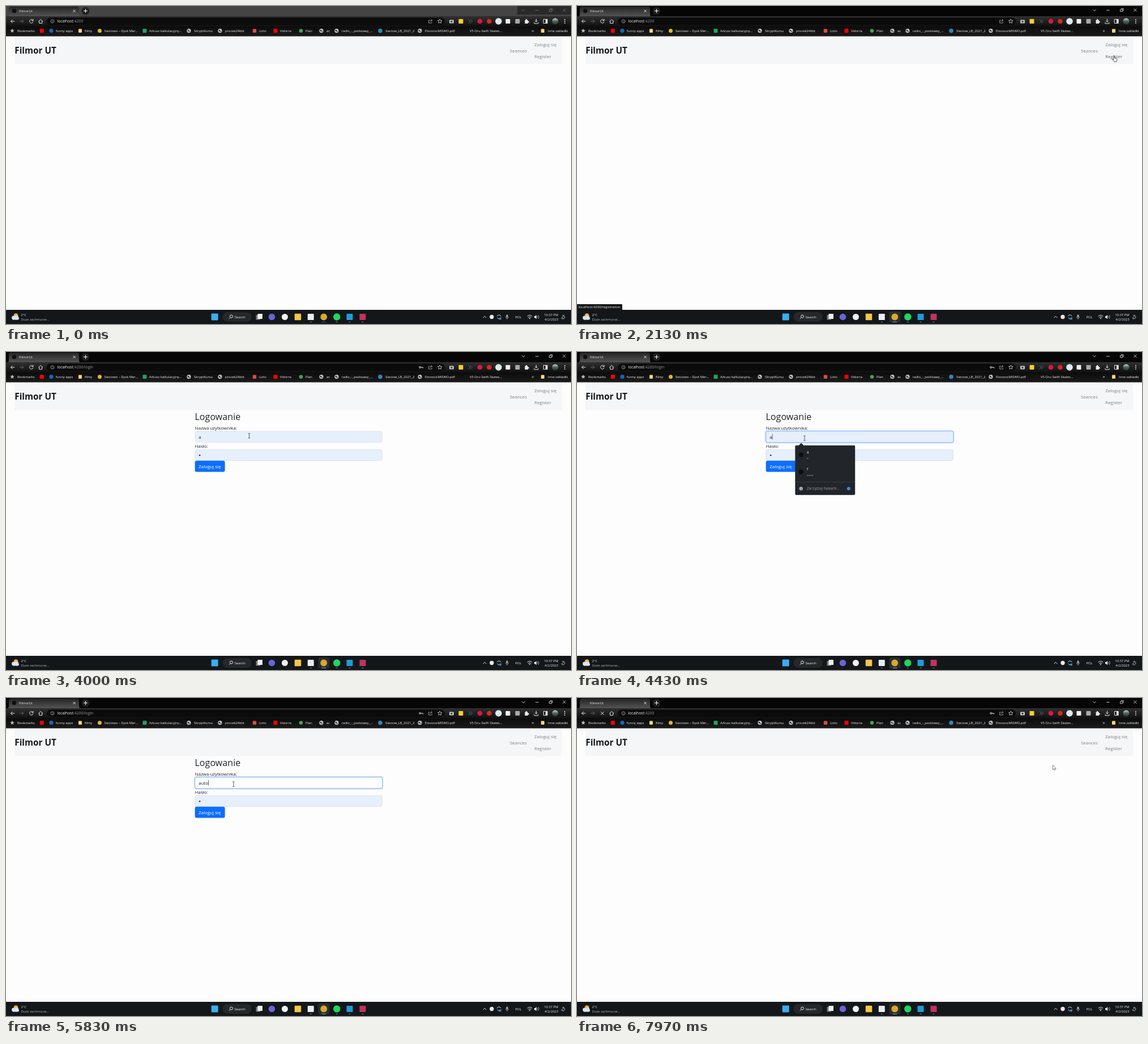
These frames come from a looping animation (998x561 px, 8 s). An HTML page:

```html
<!DOCTYPE html>
<html lang="pl">
<head>
<meta charset="utf-8">
<title>FilmorUt</title>
<style>
  html, body { margin: 0; width: 100%; height: 100%; overflow: hidden; background: #fdfdfd; }
  svg { display: block; width: 100%; height: 100%; }
  text { font-family: "Open Sans", "Noto Sans", sans-serif; white-space: pre; }
  .line { fill: none; stroke: #e4e4e4; stroke-width: 1; stroke-linecap: round; stroke-linejoin: round; }
</style>
</head>
<body>
<svg id="stage" viewBox="0 0 998 561" xmlns="http://www.w3.org/2000/svg"></svg>
<script>
const LOOP = 8000;
const INK = '#212529', BLUE = '#0d6efd', PALE = '#e6effc', PAGE = '#fdfdfd';

// Markup helpers
const text = (x, y, str, size = 5.85, fill = '#f0f0f0', extra = '') =>
  `<text x="${x}" y="${y}" font-size="${size}" fill="${fill}" ${extra}>${str}</text>`;
const rect = (x, y, w, h, fill, r = 0, extra = '') =>
  `<rect x="${x}" y="${y}" width="${w}" height="${h}" rx="${r}" fill="${fill}" ${extra}/>`;
const dot = (x, y, r, fill, extra = '') => `<circle cx="${x}" cy="${y}" r="${r}" fill="${fill}" ${extra}/>`;
const square = (x, y, size, fill) => rect(x - size / 2, y - size / 2, size, size, fill, 1);
const line = (d, extra = '') => `<path class="line" d="${d}" ${extra}/>`;
const group = (id, body) => `<g id="${id}">${body}</g>`;
const globe = (x, y) => dot(x, y, 3.6, '#c6cacd') +
  `<path d="M${x - 2.6} ${y - 1.2}q2 -1.6 3 .4t-1.6 2.4zM${x + .6} ${y + .6}h2.2l-1.6 2z" fill="#303336"/>`;
const folder = (x, y) => rect(x - 3, y - 3.2, 6, 6.6, '#f5d676', .8);
const star = (x, y, r, extra) => {
  const points = Array.from({ length: 10 }, (_, i) => {
    const a = i * Math.PI / 5 - Math.PI / 2, d = i % 2 ? r * .45 : r;
    return `${(x + d * Math.cos(a)).toFixed(2)},${(y + d * Math.sin(a)).toFixed(2)}`;
  });
  return `<polygon points="${points.join(' ')}" ${extra}/>`;
};

function tabStrip() {
  return rect(0, 0, 998, 19, '', 0, 'id="strip"') +
    '<path d="M2 18.5q3 0 3 -4v-10q0 -3.5 3.5 -3.5h117q3.5 0 3.5 3.5v10q0 4 3 4z" fill="url(#tab)"/>' +
    group('favicon', dot(14.5, 8.7, 3.7, '#101010')) +
    text(23, 10.8, 'FilmorUt', 5.9) +
    line('M118.8 7l3.6 3.6m0 -3.6l-3.6 3.6') +
    dot(140.5, 8.7, 6.8, '#202020') + line('M137.5 8.7h6m-3 -3v6', 'style="stroke:#fff"') +
    group('windowShade', rect(903, 0, 95, 15, '#292929')) +
    group('windowButtons', line('M911.5 6.3l2.5 2.4l2.5 -2.4M935.5 7.5h5M960 6h3.8v3.8h-3.8zM961.5 4.7h3.6v3.6M983.7 5l4.6 4.6m0 -4.6l-4.6 4.6', 'style="stroke-width:.8"'));
}

function toolbar() {
  const icons = [
    dot(837, 27, 4.3, '#dd1744'), dot(853.5, 27, 4.3, '#d8281f'), dot(870, 27, 5.8, '#dfeaec'),
    square(803.5, 27, 8, '#f4cf2d'), square(886.5, 27, 8, '#f0f0f0'), square(903.5, 27, 8, '#a9a9a9'),
    rect(783, 24.5, 8, 6, '#bfc3c5', 1), dot(787, 27.5, 1.6, '#333'),
    line('M817 24l3 3l-3 3m3.5 -6l3 3l-3 3', 'style="stroke:#4c7180"'),
    rect(916.5, 25, 5.5, 6, '#e8e8e8', .6), dot(919.2, 24.6, 1.5, '#e8e8e8'), dot(922.5, 28, 1.5, '#e8e8e8'),
    line('M936.5 23v5m-2 -2l2 2l2 -2M933 29v2h7v-2'),
    line('M949.8 23.5h6.4v7h-6.4z'), rect(953, 23.5, 3.2, 7, '#e4e4e4'),
    dot(970, 27, 5.5, 'url(#avatar)'),
    ...[24, 27, 30].map(y => dot(987, y, .9, '#e8e8e8'))
  ];
  return rect(0, 18, 998, 18, 'url(#bar)') + rect(72, 20.5, 703, 13, '#0b0b0b', 6.5) +
    line('M14.8 27h-6.3m2.7 -2.7l-2.7 2.7l2.7 2.7') +
    line('M24.5 27h6.3m-2.7 -2.7l2.7 2.7l-2.7 2.7', 'style="stroke:#666"') +
    group('reload', line('M47.6 25.3a3.2 3.2 0 1 0 .3 2.7M48 23.4v2.4h-2.4')) +
    group('stop', line('M42.2 24.5l5 5m0 -5l-5 5')) +
    line('M57.6 27l3.6 -3.3l3.6 3.3M58.7 26.5v4h5v-4') +
    line('M85 27a3 3 0 1 0 -6 0a3 3 0 1 0 6 0M82 27v1.5M82 25.4v.1', 'style="stroke:#b5b8ba;stroke-width:.7"') +
    '<text x="90.5" y="29.4" font-size="6.8" fill="#f2f2f2">localhost<tspan id="url" fill="#92969a"></tspan></text>' +
    group('passwordKey', dot(731.2, 27, 1.4, 'none', 'stroke="#ddd"') + line('M733 27h3.5v1.3')) +
    line('M748.5 25h-2v5h5.8v-2M748.5 28q.5 -3 4 -3m-1.5 -1.7l1.7 1.7l-1.7 1.7', 'style="stroke:#aaa;stroke-width:.8"') +
    star(766.3, 27, 4, 'fill="none" stroke="#ddd" stroke-width=".8"') + icons.join('');
}

function bookmarks() {
  const y = 43.7;
  const labels = [
    [20, 'Bookmarks'], [88, 'funny apps'], [139, 'filmy'], [173.5, 'Sieciowo – Dysk Mer...'],
    [253, 'Arkusz kalkulacyjny...'], [332, 'SkryptKursu'], [387, 'procek24kbt'], [447, 'Lizto'],
    [484, 'Vidorra'], [529, 'Plan'], [566, 'ac'], [593, 'radio_-_podstawy_...'],
    [670, 'Sieciow_LB_2021_2'], [740, 'EloooooMISWO.pdf'], [819, 'V5 Oru Swift Skates...'],
    [957, 'Inne zakładki']
  ];
  return rect(0, 36, 998, 17.5, 'url(#shelf)') + star(11, y, 4, 'fill="#b9bcbe"') +
    square(63.3, y, 7, '#f00') + dot(80, y, 3.6, '#1767b8') + folder(131, y) +
    dot(165.5, y, 3.5, '#e3b72f') + square(245, y, 7, '#1fa463') +
    [323, 378, 557, 584, 731].map(x => globe(x, y)).join('') +
    square(439, y, 6.5, '#dd4b3e') + square(476, y, 7, '#f00') + dot(521, y, 3.3, '#43a45a') +
    dot(661, y, 3.8, '#2f87b6') + dot(811, y, 3.2, '#161616') + folder(948, y) +
    labels.map(([x, str]) => text(x, 45.8, str)).join('') + text(928.5, 46, '»', 8);
}

function field(x, y, w, id = '') {
  return rect(x, y, w, 19.2, PAGE, 3, `${id && `id="${id}"`} stroke="#ced4da" stroke-width=".6"`);
}

function button(x, y, w, label) {
  return rect(x, y, w, 19.8, BLUE, 3) + text(x + 6.6, y + 12.9, label, 7.9, '#fff');
}

function pages() {
  const labels = ['Email', 'Nazwa użytkownika', 'Imię', 'Nazwisko', 'Hasło'];
  const registration = text(349, 124, 'Rejestracja użytkownika', 20.1, INK, 'font-weight="500"') +
    labels.map((label, i) => text(349.2, 141.8 + i * 32.2, label, 7.9, INK) + field(349.3, 145.2 + i * 32.2, 299.4)).join('') +
    button(349, 293.4, 37, 'Zapisz');
  const login = text(333.5, 120, 'Logowanie', 16.1, INK, 'font-weight="500"') +
    text(333.8, 136.5, 'Nazwa użytkownika:', 7.9, INK) + text(333.8, 168.8, 'Hasło:', 7.9, INK) +
    field(334, 140, 330.4, 'nameField') + field(334, 172.2, 330.4, 'passField') +
    rect(333.2, 139.2, 332, 20.8, 'none', 3.6, 'id="focusRing" stroke="#a9cbfc" stroke-width="2"') +
    text(340.3, 152.7, '', 7.9, INK, 'id="nameText"') + group('passDots', '') +
    rect(0, 145, .7, 9.5, INK, 0, 'id="caret"') + button(333.7, 191.7, 53, 'Zaloguj się') + group('popup', popup());
  return rect(15, 54, 967, 48.5, '#f5f6f7') +
    text(15.3, 84.4, 'Filmor UT', 15.3, '#15181a', 'font-weight="700"') +
    text(890, 81.5, 'Seances', 7.9, '#7c7f81') +
    text(933.3, 71.2, 'Zaloguj się', 7.9, '', 'id="loginLink"') +
    text(933.3, 91.9, 'Register', 7.9, '', 'id="registerLink"') +
    group('registration', registration) + group('login', login) +
    group('status', rect(-2, 526, 0, 12, '#151719', 1.5, 'id="statusBox"') + text(2.5, 533.2, '', 5.95, '#eee', 'id="statusText"'));
}

function popup() {
  return '<path d="M390.5 166l5.5 -5.5l5.5 5.5z" fill="#222529"/>' +
    rect(385.3, 164.8, 105.9, 87.5, '#222529', 2) +
    dot(395.7, 181.5, 3.9, '#0b0c0d') + dot(395.7, 211.5, 3.9, '#0b0c0d') +
    text(406, 179.2, 'a', 6.3) + text(406, 209.2, 'f', 6.3) + dot(407.5, 187.8, .8, '#c8c8c8') +
    [0, 1, 2, 3].map(i => dot(407.5 + i * 2.8, 217.8, .8, '#c8c8c8')).join('') +
    rect(385.3, 229.3, 105.9, .6, '#45484c') + dot(395.7, 241, 3.3, '#a3a6a9') +
    text(406, 243.2, 'Zarządzaj hasłami...', 6.3, '#9a9da1') + dot(479.8, 241, 3, '#4a83dc');
}

function taskbar() {
  const y = 548.5;
  return rect(0, 536, 998, 25, '#13171a') +
    dot(17.5, 546, 3.8, '#f3b63a') + dot(13.5, 550, 3.4, '#d8e4f2') + dot(18.5, 549.8, 3.8, '#d8e4f2') + rect(11, 549, 12, 4.5, '#d8e4f2', 2.2) +
    text(26.5, 547, '2°C') + text(26.5, 555.2, 'Duże zachmurze...', 5.85, '#b5b8ba') +
    square(368.7, y, 12, '#3aaef0') + rect(382.5, 540, 51.5, 17, '#25282b', 8.5) +
    dot(398, 547.5, 2.5, 'none', 'stroke="#eee"') + line('M396.2 549.5l-2 2') + text(403.5, 550.8, 'Search', 6.1) +
    rect(441.5, 545, 7.5, 8.5, '#777b7e') + rect(444.5, 543, 8.5, 9, '#f0f0f0') +
    dot(469.5, y, 5.8, '#6b63d8') + dot(492.5, y, 5.5, '#f2f2f2') + square(515.5, y, 11.5, '#f6c644') +
    square(538.3, y, 11, '#e9edf0') +
    group('activeApp', rect(551.5, 539, 20, 19, '#2a2d30', 2)) +
    dot(561.3, y, 5.9, '#d9a82c') + dot(584.3, y, 6.2, '#1ed760') + square(607, y, 11, '#2299d8') + square(630, y, 11, '#c3325d') +
    [538.3, 584.3, 607, 630].map(x => rect(x - 1.5, 557, 3, 1, '#8d9194', .5)).join('') +
    rect(557.5, 557, 8, 1, '#5fb8e8', .5, 'id="activeMark"') +
    line('M843 549.8l2.5 -2.5l2.5 2.5') + dot(858, y, 3.7, '#e4e7e9') +
    line('M867.5 547a3.6 3.6 0 0 1 6.5 0M874.5 550a3.6 3.6 0 0 1 -6.5 0', 'style="stroke:#ddd"') + dot(873, 551.5, 2, '#2b8be0') +
    rect(883.7, 544.5, 2.8, 5, '#b9bcbe', 1.4) + line('M882.5 548.5q0 2.5 2.6 2.5t2.6 -2.5M885.1 551v1.5', 'style="stroke:#b9bcbe;stroke-width:.7"') +
    text(899.5, 550.8, 'POL') +
    line('M921 547q4 -3.4 8 0M922.6 549.2q2.4 -2 4.8 0') + dot(925, 551.3, 1, '#e4e4e4') +
    '<path d="M933 547h1.8l2.2 -2v7.2l-2.2 -2h-1.8z" fill="#e4e4e4"/>' + line('M938.5 547q1.2 1.5 0 3M940.3 545.5q2.2 3 0 6', 'style="stroke-width:.7"') +
    text(975.5, 547, '10:37 PM', 5.85, '#eee', 'text-anchor="end"') + text(975.5, 555.2, '4/2/2023', 5.85, '#eee', 'text-anchor="end"') +
    line('M984 545.5a3.2 3.2 0 1 1 -3 4.8q3.8 -.6 3 -4.8z', 'style="stroke-width:.8"');
}

const pointer = {
  arrow: '<path d="M0 0v8l2 -1.7l1.3 2.7l1.2 -.6l-1.3 -2.6h2.5z" fill="#fff" stroke="#555" stroke-width=".7"/>',
  hand: '<path d="M0 0q1 -1 1.7 0v3.8l3.2 .8q1.2 .4 1 2l-.7 3.6h-4.6l-2.9 -4q.8 -1 2.3 .5z" fill="#fff" stroke="#333" stroke-width=".8" stroke-linejoin="round"/>',
  beam: '<path d="M-1.8 -4.2h1.3l.5 .4l.5 -.4h1.3M0 -3.8v7.6M-1.8 4.2h1.3l.5 -.4l.5 .4h1.3" fill="none" stroke="#333" stroke-width=".8"/>'
};

const gradient = (id, ...stops) => `<linearGradient id="${id}" x2="0" y2="1">` +
  stops.map((c, i) => `<stop offset="${i / (stops.length - 1)}" stop-color="${c}"/>`).join('') + '</linearGradient>';

const stage = document.getElementById('stage');
stage.innerHTML = '<defs>' + gradient('tab', '#242424', '#555') + gradient('bar', '#303030', '#101010') +
  gradient('shelf', '#0c0c0c', '#1b1b1b') + gradient('avatar', '#cfd8d6', '#48635c', '#26342f') + '</defs>' +
  rect(0, 0, 998, 561, PAGE) + pages() + tabStrip() + toolbar() + bookmarks() + taskbar() +
  group('cursor', Object.keys(pointer).map(k => group(k, pointer[k])).join(''));

const $ = id => document.getElementById(id);
const show = (id, on) => $(id).style.display = on ? '' : 'none';
const set = (id, attrs) => { for (const k in attrs) $(id).setAttribute(k, attrs[k]); };
const label = (id, str) => { if ($(id).textContent !== str) $(id).textContent = str; };

// Timeline in ms
const FOCUS = 400, REGISTER = 2250, LOGIN = 3400, CLICK = 4170, TAB = 6250, SUBMIT = 7480, RELOAD = 7600;
const NAME_KEYS = [5050, 5330, 5620, 5900], PASS_KEYS = [6480, 6680, 6870, 7060, 7250];
const PATH = [[1000, 1004, 184], [1100, 993.5, 178], [1650, 948, 88], [2600, 948, 88], [3000, 946.5, 69.5],
  [3500, 946.5, 69.5], [4080, 402, 152], [7480, 402, 152], [7940, 840.5, 118.5]];

function cursorAt(t) {
  const i = PATH.findIndex(p => p[0] > t);
  if (i < 0) return PATH[PATH.length - 1].slice(1);
  if (!i) return PATH[0].slice(1);
  const [a, b] = [PATH[i - 1], PATH[i]];
  const u = (t - a[0]) / (b[0] - a[0]), s = u * u * (3 - 2 * u);
  return [a[1] + (b[1] - a[1]) * s, a[2] + (b[2] - a[2]) * s];
}

function drawLogin(t) {
  const typed = NAME_KEYS.filter(k => k <= t).length;
  const dots = t < PASS_KEYS[0] ? 1 : PASS_KEYS.filter(k => k <= t).length;
  const inPass = t >= TAB;
  label('nameText', 'autor'.slice(0, 1 + typed));
  set('nameField', { fill: typed ? PAGE : PALE });
  set('passField', { fill: t < PASS_KEYS[0] ? PALE : PAGE });
  if ($('passDots').childElementCount !== dots)
    $('passDots').innerHTML = Array.from({ length: dots }, (_, i) => dot(342.2 + i * 3.4, 182.2, 1.25, INK)).join('');
  show('focusRing', t >= CLICK);
  set('focusRing', { y: inPass ? 171.4 : 139.2 });
  show('popup', t >= CLICK + 60 && !typed);
  const last = Math.max(...[CLICK, TAB, ...NAME_KEYS, ...PASS_KEYS].filter(k => k <= t));
  show('caret', t >= CLICK && (t - last) % 1060 < 530);
  const x = 340.3 + (inPass ? dots * 3.4 : $('nameText').getComputedTextLength());
  set('caret', { x, y: inPass ? 177.2 : 145 });
}

function draw(t) {
  const focused = t >= FOCUS;
  const onRegister = t >= REGISTER && t < LOGIN, onLogin = t >= LOGIN && t < SUBMIT;
  const [x, y] = cursorAt(t);
  const overLinks = x > 932 && x < 974;
  const overLogin = overLinks && y > 61 && y < 77, overRegister = overLinks && y > 81 && y < 98;
  const overField = onLogin && x < 664 && y > 139 && y < 160;
  const kind = overLogin || overRegister ? 'hand' : overField ? 'beam' : 'arrow';

  set('strip', { fill: focused ? '#060606' : '#444' });
  show('windowShade', !focused);
  set('windowButtons', { opacity: focused ? 1 : .4 });
  show('activeApp', focused);
  set('activeMark', { opacity: focused ? 1 : .4 });
  show('favicon', t < RELOAD);
  show('reload', t < RELOAD);
  show('stop', t >= RELOAD);
  show('passwordKey', t >= LOGIN + 50);
  label('url', ':4200' + (onRegister ? '/registration' : onLogin ? '/login' : ''));

  show('registration', onRegister);
  show('login', onLogin);
  if (onLogin) drawLogin(t);
  set('loginLink', { fill: overLogin ? '#55585a' : '#7c7f81' });
  set('registerLink', { fill: overRegister || onRegister ? '#606365' : '#7c7f81' });

  show('status', overLogin || overRegister);
  label('statusText', 'localhost:4200/' + (overLogin ? 'login' : 'registration'));
  if (overLogin || overRegister) set('statusBox', { width: 8 + $('statusText').getComputedTextLength() });

  show('cursor', t >= PATH[0][0]);
  set('cursor', { transform: `translate(${x} ${y})` });
  for (const k in pointer) show(k, k === kind);
}

function tick() {
  draw(performance.now() % LOOP);
  requestAnimationFrame(tick);
}
tick();
</script>
</body>
</html>
```
